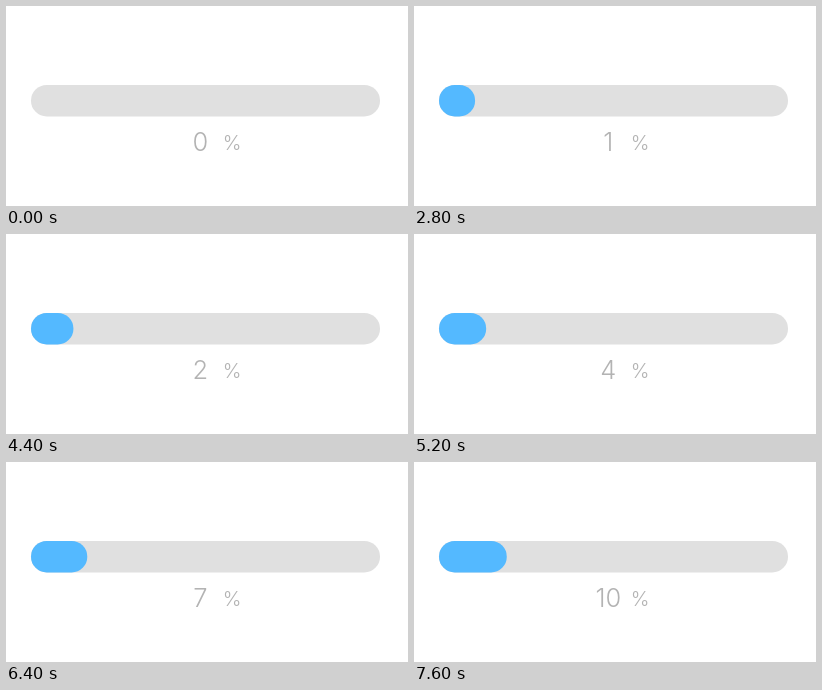
These frames come from a looping animation (402 px wide and 200 px high, 8000 ms). An HTML page:

```html
<!DOCTYPE html>
<html lang="en">
<head>
<meta charset="utf-8">
<title>Progress bar</title>
<style>
  html, body { margin: 0; width: 100%; height: 100%; overflow: hidden; background: #fff; }
  svg { display: block; width: 100%; height: 100%; }
  text { font-family: Inter, "Open Sans", sans-serif; font-weight: 300; fill: #b3b3b3; text-anchor: middle; }
</style>
</head>
<body>
<svg viewBox="0 0 402 200">
  <rect x="25" y="79" width="349" height="31.4" rx="15.7" fill="#e0e0e0"/>
  <rect id="fill" x="25" y="79" width="34" height="31.4" rx="15.7" fill="#54b9ff"/>
  <text id="count" x="194.3" y="145.3" font-size="25.5">0</text>
  <text x="226" y="143.8" font-size="20">%</text>
</svg>
<script>
  const LOOP = 8000, START = 1200, STEP = 400;
  const fill = document.getElementById('fill');
  const count = document.getElementById('count');

  // Quadratic ease-in, advanced in whole steps; the first two steps rest.
  function draw(t) {
    const step = Math.floor((t - START) / STEP);
    const grown = step < 2 ? 0 : step * step;
    fill.setAttribute('visibility', t < START ? 'hidden' : 'visible');
    fill.setAttribute('width', 34 + 0.132 * grown);
    count.textContent = Math.round(0.0388 * grown);
  }

  function tick() {
    draw(performance.now() % LOOP);
    requestAnimationFrame(tick);
  }
  tick();
</script>
</body>
</html>
```
